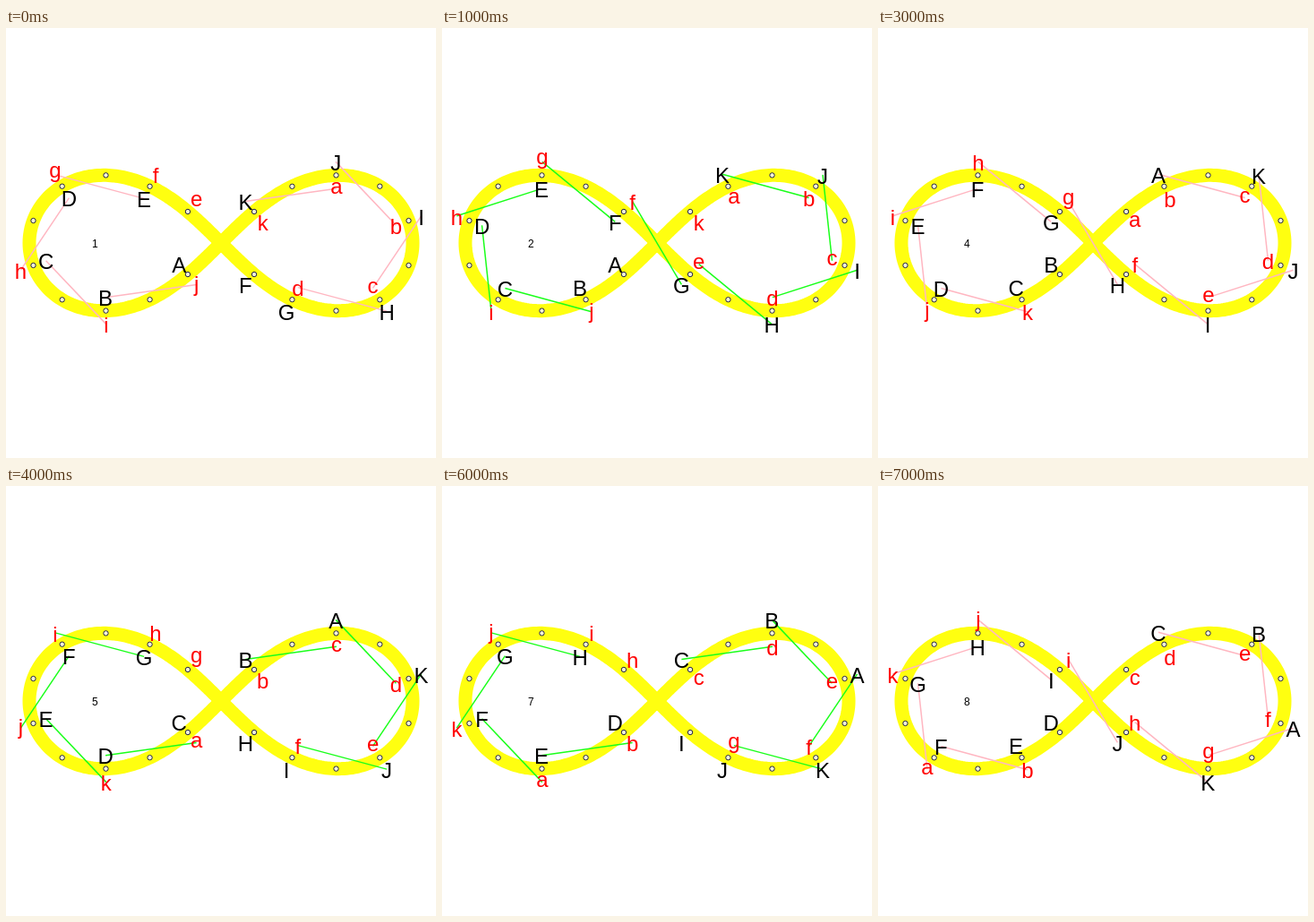
An HTML page with a canvas that plays this animation: 480x480 px, repeating every 8 s.

```html
<!DOCTYPE html>
<html>
<head>
<meta charset="utf-8">
<style>
  html, body { margin: 0; width: 100%; height: 100%; overflow: hidden; background: #fff; }
  canvas { display: block; }
</style>
</head>
<body>
<canvas id="stage" width="480" height="480"></canvas>
<script>
const ctx = document.getElementById('stage').getContext('2d');
const A = 214, C = 240, SLOTS = 22, LETTERS = 11, OFFSET = 15;
const FONT = 'px "Liberation Sans", Arial, sans-serif';
const mod = k => (k % SLOTS + SLOTS) % SLOTS;

function lemniscate(t) {
  const s = Math.sin(t), x = A * Math.cos(t) / (1 + s * s);
  return [x, x * s];
}

// Slots spaced evenly by arc length; slots 0 and 11 are the crossing.
const slots = [];
const step = 5.2441151 / SLOTS / 200;
for (let k = 0, t = Math.PI / 2; k < SLOTS; k++) {
  const [x, y] = lemniscate(t), normal = 3 * Math.atan(y / x);
  const nx = OFFSET * Math.cos(normal), ny = OFFSET * Math.sin(normal);
  slots.push({
    dot: [C + x, C - y],
    black: [C + x + nx, C - y - ny],
    red: [C + x - nx, C - y + ny]
  });
  for (let i = 0; i < 200; i++) {
    const mid = t - step / 2 * Math.hypot(1, Math.sin(t));
    t -= step * Math.hypot(1, Math.sin(mid));
  }
}
const isCrossing = k => k % 11 === 0;

function label(text, [x, y], color) {
  ctx.fillStyle = color;
  const m = ctx.measureText(text);
  const shift = 'aceg'.includes(text) ? -1 : 1.2;
  const rise = (m.actualBoundingBoxAscent - m.actualBoundingBoxDescent) / 2;
  ctx.fillText(text, x, y + rise + shift);
}

function drawBand() {
  ctx.beginPath();
  for (let i = 0; i <= 400; i++) {
    const [x, y] = lemniscate(i * Math.PI / 200);
    ctx.lineTo(C + x, C - y);
  }
  ctx.closePath();
  ctx.strokeStyle = '#ffff10';
  ctx.lineWidth = 15;
  ctx.stroke();

  ctx.lineWidth = 1;
  ctx.strokeStyle = '#222244';
  ctx.fillStyle = '#f4f4d8';
  slots.forEach(({ dot }, k) => {
    if (isCrossing(k)) return;
    ctx.beginPath();
    ctx.arc(...dot, 2.7, 0, 2 * Math.PI);
    ctx.fill();
    ctx.stroke();
  });
}

function drawLetters(n) {
  ctx.font = 24 + FONT;
  for (let i = 0; i < LETTERS; i++) {
    let b = mod(n - 1 - 2 * i), r = mod(3 - n + 2 * i);
    if (isCrossing(b)) b = mod(b - 1);
    if (isCrossing(r)) r = mod(r + 1);
    label(String.fromCharCode(65 + i), slots[b].black, '#000');
    label(String.fromCharCode(97 + i), slots[r].red, '#f00');
  }
}

function drawLinks(n, count) {
  const prime = [2, 3, 5, 7].includes(count);
  ctx.strokeStyle = prime ? '#1aff1a' : '#ffb6c1';
  ctx.lineWidth = 1.5;
  for (let p = 1 + n % 2; p < 20; p += 2) {
    if (isCrossing(p) || isCrossing(p + 2)) continue;
    ctx.beginPath();
    ctx.moveTo(...slots[p].black);
    ctx.lineTo(...slots[p + 2].red);
    ctx.stroke();
  }
}

function draw() {
  const n = Math.floor(performance.now() / 1000) % 8;
  ctx.fillStyle = '#fff';
  ctx.fillRect(0, 0, 480, 480);
  ctx.textAlign = 'center';
  drawBand();
  drawLinks(n, n + 1);
  drawLetters(n);
  ctx.font = 12 + FONT;
  ctx.fillStyle = '#000';
  ctx.fillText(n + 1, 99.3, 245);
  requestAnimationFrame(draw);
}
draw();
</script>
</body>
</html>
```
